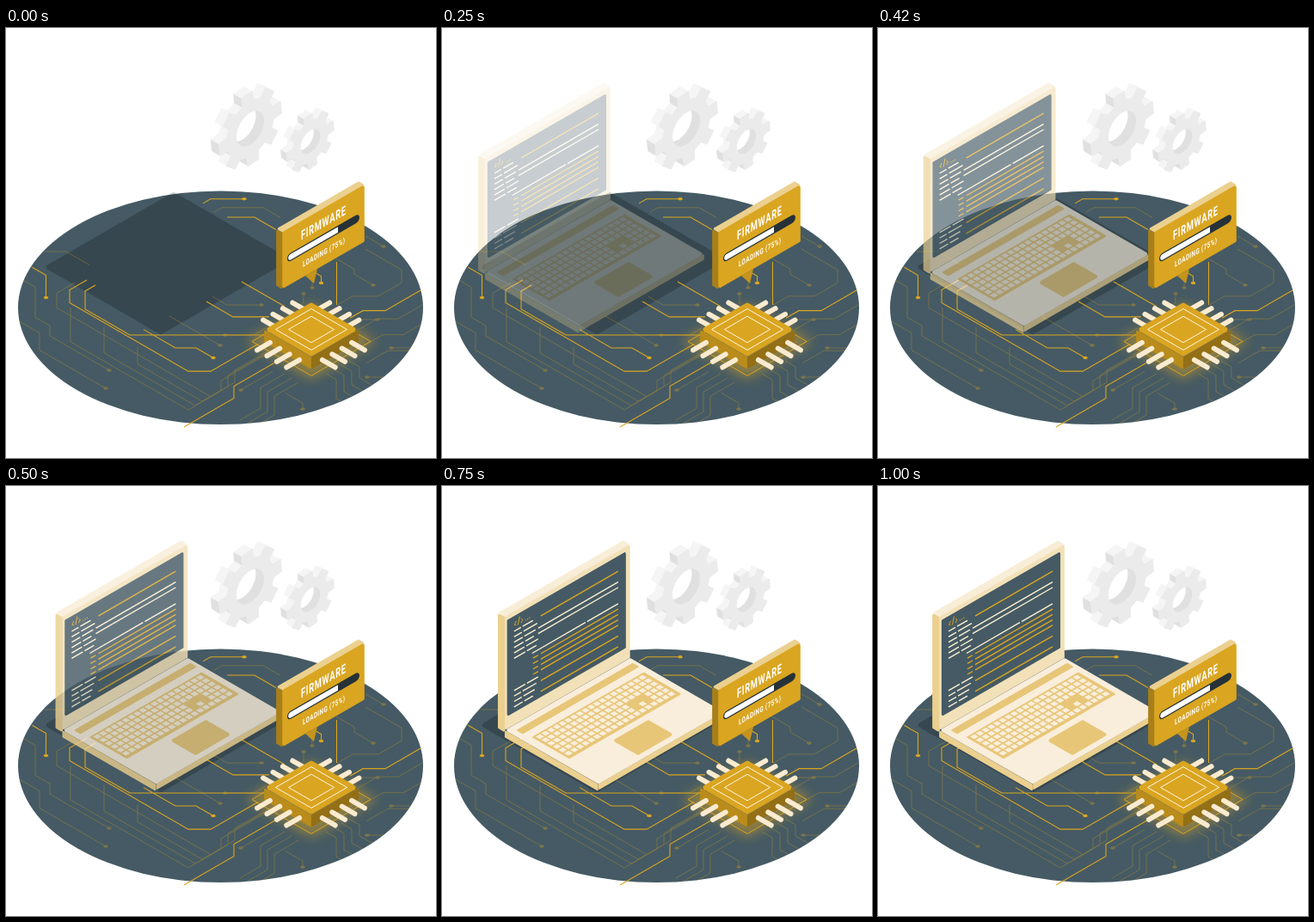
An HTML page for the animation above (1.04 s loop, 500 px wide and 500 px high).

```html
<!DOCTYPE html>
<html lang="en">
<head>
<meta charset="utf-8">
<title>Firmware loading</title>
<style>
html, body { margin: 0; width: 100%; height: 100%; overflow: hidden; background: #fff; }
svg { display: block; width: 100%; height: 100%; }
text { font-family: Roboto, Inter, sans-serif; fill: #fff; }
</style>
</head>
<body>
<svg id="stage" viewBox="0 0 500 500"></svg>
<script>
const GOLD = '#daa520', CREAM = '#f9eedb', TAN = '#ebd08f', AMBER = '#e8c678', SLATE = '#455a64';
const SLOPE = 0.577;
// Isometric axes: A runs up right, B runs down right, Z runs straight down.
const AXES = { A: [1, -SLOPE], B: [1, SLOPE], Z: [0, 1] };

const range = (n, make) => Array.from({ length: n }, (_, i) => make(i));
const poly = (points, fill, round = 0) =>
  `<polygon points="${points.join(' ')}" fill="${fill}" stroke="${fill}" stroke-width="${round}" stroke-linejoin="round"/>`;
const path = (d, stroke, width = 1, extra = '') =>
  `<path d="${d}" fill="none" stroke="${stroke}" stroke-width="${width}" ${extra}/>`;
const group = (content, attrs) => `<g ${attrs}>${content}</g>`;

function corners(axes, x, y, a, b) {
  const [u, v] = [...axes].map(name => AXES[name]);
  return [[0, 0], [a, 0], [a, b], [0, b]].map(([p, q]) => [x + p * u[0] + q * v[0], y + p * u[1] + q * v[1]]);
}

// Parallelogram spanned by two axes; rounding stays inside its outline.
function face(axes, x, y, a, b, fill, round = 0) {
  const inset = round * 0.55;
  const [p0, , p2] = corners(axes, 0, 0, inset, inset);
  return poly(corners(axes, x + p2[0] - p0[0], y + p2[1] - p0[1], a - 2 * inset, b - 2 * inset), fill, round);
}

const outline = (x, y, size, color, width = 1) =>
  path(`M${corners('AB', x, y, size, size).join('L')}Z`, color, width, 'stroke-linejoin="round"');

// Circuit trace from compass moves, such as "se20 s15 e40".
function trace(x, y, moves) {
  let d = `M${x} ${y}`;
  for (const [, heading, length] of moves.matchAll(/([nsew]+)([\d.]+)/g)) {
    const dx = heading.includes('e') ? 1 : heading.includes('w') ? -1 : 0;
    const dy = heading.includes('s') ? 1 : heading.includes('n') ? -1 : 0;
    d += `l${dx * length} ${dy * length * (dx ? SLOPE : 1)}`;
  }
  return d;
}

function wiring(plain, dotted, width) {
  const dots = dotted.map(([x, y]) => `<ellipse cx="${x}" cy="${y}" rx="2.8" ry="1.8" fill="${GOLD}"/>`);
  return path([...plain, ...dotted].map(t => trace(...t)).join(''), GOLD, width) + dots.join('');
}

function board() {
  const disc = fill => `<ellipse cx="249.5" cy="325.2" rx="235.5" ry="135.8" fill="${fill}"/>`;
  const buses = [
    ...range(3, i => [212 + 8 * i, 444 - 5 * i, `nw${137 - 31 * i} n${40 - 10 * i}`]),
    ...range(3, i => [212 + 8 * i, 444 - 5 * i, `ne38 n${12 + i} ne${50 - 4 * i}`]),
    ...range(4, i => [372 + 9 * i, 402 - 5 * i, `se12 s${22 - 3 * i} se${15 + 2 * i}`]),
    ...range(3, i => [340 - 8 * i, 412 - 5 * i, `sw28 s${22 + i} sw24`]),
    ...range(3, i => [484, 322 + 22 * i, `sw${28 - 6 * i} w24 sw25`]),
    [237, 428, 'nw178 n17 ne21'], [45, 260, 'e25 se27'], [242, 214, 'ne9 e48 se20'],
    [418, 257, 'se42 s15 sw27 w30 sw18']
  ];
  const ends = [
    [116, 419, 'nw77 n20 nw23'], [120, 398, 'nw69 n12 nw17 n35 nw14'], [249, 369, 'nw59'],
    [255, 357, 'e33 ne14'], [297, 322, 'w40 nw17'], [346, 309, 's12'], [356, 302, 'n11'],
    [427, 299, 'nw22 n6 nw21'], [439, 254, 'nw21'], [432, 339, 'w22 sw10'], [448, 372, 'e34'],
    [420, 406, 'e25 ne30'], [273, 421, 'ne37'], [345, 443, 'n7 nw20']
  ];
  const bright = [
    [257, 220, 'e32 se25'], [384.5, 272, 's50'], [482, 305, 'sw41 w26 sw15'], [233, 318, 'se31 e42'],
    [274, 295, 'se50'], [94, 293, 'sw20 s15 se138 e26 ne55'], [104, 299, 'sw12 s21 se52 e158'],
    [207, 464, 'ne58 n14 ne49']
  ];
  const brightEnds = [
    [46.5, 313.5, 'n26 nw16'], [277, 198.7, 'w39 sw9'], [366.5, 296.5, 'n8 nw9'], [241, 383.5, 'nw20 w24 nw37']
  ];
  return disc(SLATE) + group(face('AB', 43, 278, 152, 137, '#000', 6), 'opacity=".2"') +
    `<clipPath id="disc">${disc('#000')}</clipPath>` +
    group(wiring(buses, ends, 0.9), 'opacity=".36" clip-path="url(#disc)"') +
    wiring(bright, brightEnds, 1.1);
}

// Extruded gear standing in the A-Z plane, depth running up and left.
function gear(cx, cy, radius, hole, depth) {
  const point = (r, a) => [cx + 0.866 * r * Math.cos(a), cy + r * Math.sin(a) - 0.5 * r * Math.cos(a)];
  const back = ([x, y]) => [x - 0.866 * depth, y - 0.5 * depth];
  const rim = range(8, k => {
    const mid = k * Math.PI / 4 - 0.1;
    return [[0.75, -0.24], [1, -0.17], [1, 0.17], [0.75, 0.24]].map(([r, a]) => point(r * radius, mid + a));
  }).flat();
  const sides = rim.map((a, i) => {
    const b = rim[(i + 1) % rim.length];
    const dx = b[0] - a[0], dy = b[1] - a[1];
    if (dx * 0.5 < dy * 0.866) return '';
    const facesUp = dx > 0 && dy < dx * 0.9;
    return poly([a, b, back(b), back(a)], facesUp ? '#f5f5f5' : '#e0e0e0', 0.6);
  });
  const ring = range(48, i => point(hole, i * Math.PI / 24));
  return sides.join('') + poly(rim, '#ebebeb', 1.4) + poly(ring, '#e0e0e0') +
    `<clipPath id="hole${cx}">${poly(ring, '#000')}</clipPath>` +
    group(poly(ring.map(back), '#fff'), `clip-path="url(#hole${cx})"`);
}

function chip() {
  const pins = place => path(range(4, place).join(''), '#faebd0', 5.8, 'stroke-linecap="round"');
  const dx = 11.4, dy = 6.7;
  const farPins = pins(i => `M${299 + i * dx} ${339.5 - i * dy}l14 8M${410.5 - i * dx} ${339.5 - i * dy}l-14 8`);
  const nearPins = pins(i => `M${292 + i * dx} ${374.5 + i * dy}l15 -8.7M${417 - i * dx} ${374.5 + i * dy}l-15 -8.7`);
  return '<filter id="blur" x="-30%" y="-30%" width="160%" height="160%"><feGaussianBlur stdDeviation="7"/></filter>' +
    group(face('AB', 279, 364.5, 76, 76, GOLD), 'filter="url(#blur)" opacity=".5"') +
    outline(286, 364.5, 69, GOLD) + farPins +
    face('BZ', 300, 351, 55, 14, '#b98c1b', 2) +
    face('AZ', 355, 382.7, 55, 14, '#936f16', 2) +
    face('AB', 300, 350.5, 55, 55, GOLD, 6) +
    outline(313.5, 350.5, 41.5, '#fff7e6') + outline(328.5, 350.5, 26.5, '#fff7e6') + nearPins;
}

function sign() {
  const onFront = (x, y, scale, content) =>
    group(content, `transform="matrix(${scale} ${-scale * SLOPE} 0 1 ${x} ${y})"`);
  const label = (size, spacing, content) =>
    `<text font-size="${size}" font-weight="700" letter-spacing="${spacing}">${content}</text>`;
  const bar = '<rect y="-4.7" width="84" height="9.4" rx="4.7" fill="#263238"/>' +
    '<path d="M59 -3.3H4.5A3.3 3.3 0 0 0 4.5 3.3H59Z" fill="#fff"/>';
  return face('BZ', 314, 233.5, 8, 66, '#a87f19', 3) +
    face('AB', 314, 233.5, 96, 8, TAN, 3) +
    poly([[348, 288], [358, 297], [362, 280]], '#c4941d') +
    face('AZ', 321, 237.5, 96, 66, GOLD, 4) +
    onFront(343, 246.7, 0.62, label(15, 1.1, 'FIRMWARE')) +
    onFront(327, 268.5, 1, bar) +
    onFront(345, 278, 0.68, label(9.2, 0.6, 'LOADING (75%)'));
}

function screenCode() {
  const left = 82, right = 203, top = 169, pitch = 6.27;
  const line = (row, from, to) => {
    const y = x => top + row * pitch - (x - left) * SLOPE;
    return `M${from} ${y(from)}L${to} ${y(to)}`;
  };
  let gold = '', pale = '';
  for (let row = 0; row < 15; row++) {
    const indented = row > 5 && row < 11;
    const split = 92 + row * 7 % 6;
    if (indented) gold += row > 6 ? line(row, 104, 110) : '';
    else pale += line(row, left, split - 2) + line(row, split, 104 + row * 5 % 7);
    if ([1, 4, 5, 11, 13].includes(row)) continue;
    if (row === 6) pale += line(row, 103, 165) + line(row, 167, right);
    else if (row === 2 || row === 3) pale += line(row, 110, right);
    else gold += line(row, 113, right);
  }
  return path(gold, GOLD, 1.4) + path(pale, '#fbefd2', 1.4) +
    path('M84.5 157l-2 4.3l2 .5M88.5 151.5l-2 10M90 154l2 1.5l-2 3.7', GOLD) +
    path('M95 156.3l6 -3.5', GOLD, 1.2, 'stroke-dasharray="1.2 1.4"');
}

function keyboard(x, y, width, depth) {
  const cols = 19, rows = 6;
  const stepA = (width - 5) / cols, stepB = (depth - 4) / rows;
  const keys = range(cols * rows, i => {
    const col = i % cols, row = Math.floor(i / cols);
    const gap = col > 12 && col < 16 && (row === 3 || (row === 4 && col !== 14));
    const a = 3 + col * stepA, b = 2 + row * stepB;
    return gap ? '' : face('AB', x + a + b, y + (b - a) * SLOPE, stepA * 0.76, stepB * 0.74, CREAM);
  });
  return face('AB', x, y, width, depth, AMBER, 2) + keys.join('');
}

function laptop() {
  const width = 146, depth = 109;
  return face('BZ', 71, 284, depth, 8, TAN, 2) +
    face('AZ', 180, 346.5, width, 7, TAN, 2) +
    face('AB', 71, 284, width, depth, CREAM, 4) +
    face('AB', 84, 284, 136, 8, AMBER, 2) +
    keyboard(102, 292, 131, 44) +
    face('AB', 196, 296, 42, 30, AMBER, 4) +
    face('BZ', 63, 147.5, 9, 134, TAN, 3) +
    face('AB', 63, 147.5, width, 9, '#f8edd7', 3) +
    face('AZ', 71, 152, width, 132, '#f2e1b8', 3) +
    face('AZ', 73.7, 156, 138.5, 112, SLATE, 3) +
    screenCode();
}

document.getElementById('stage').innerHTML =
  board() + gear(284, 117, 42, 18.5, 11) + gear(354, 132, 31.5, 13, 8.5) +
  group(laptop(), 'id="laptop"') + chip() + sign();

const LOOP = 1040, FPS = 24, LEAD = 0.038;
const laptopNode = document.getElementById('laptop');

// cubic-bezier(.36, -.01, .5, 1.38), solved by bisection
function ease(t) {
  const bezier = (u, a, b) => 3 * u * (1 - u) ** 2 * a + 3 * u * u * (1 - u) * b + u ** 3;
  let low = 0, high = 1;
  for (let i = 0; i < 24; i++) {
    const u = (low + high) / 2;
    if (bezier(u, 0.36, 0.5) < t) low = u; else high = u;
  }
  return bezier(low, -0.01, 1.38);
}

// Steps at 24 per second, each starting on a 10 ms tick.
function render(ms) {
  const tick = Math.floor((ms % LOOP) / 10) * 10;
  const step = Math.floor((tick + 4.99) * FPS / 1000);
  const p = step ? ease(Math.min(1, step / FPS + LEAD)) : 0;
  laptopNode.setAttribute('transform', `translate(${30 * (p - 1)} 0)`);
  laptopNode.setAttribute('opacity', Math.max(0, Math.min(1, p)));
}

const start = performance.now();
function loop() {
  render(performance.now() - start);
  requestAnimationFrame(loop);
}
loop();
</script>
</body>
</html>
```
